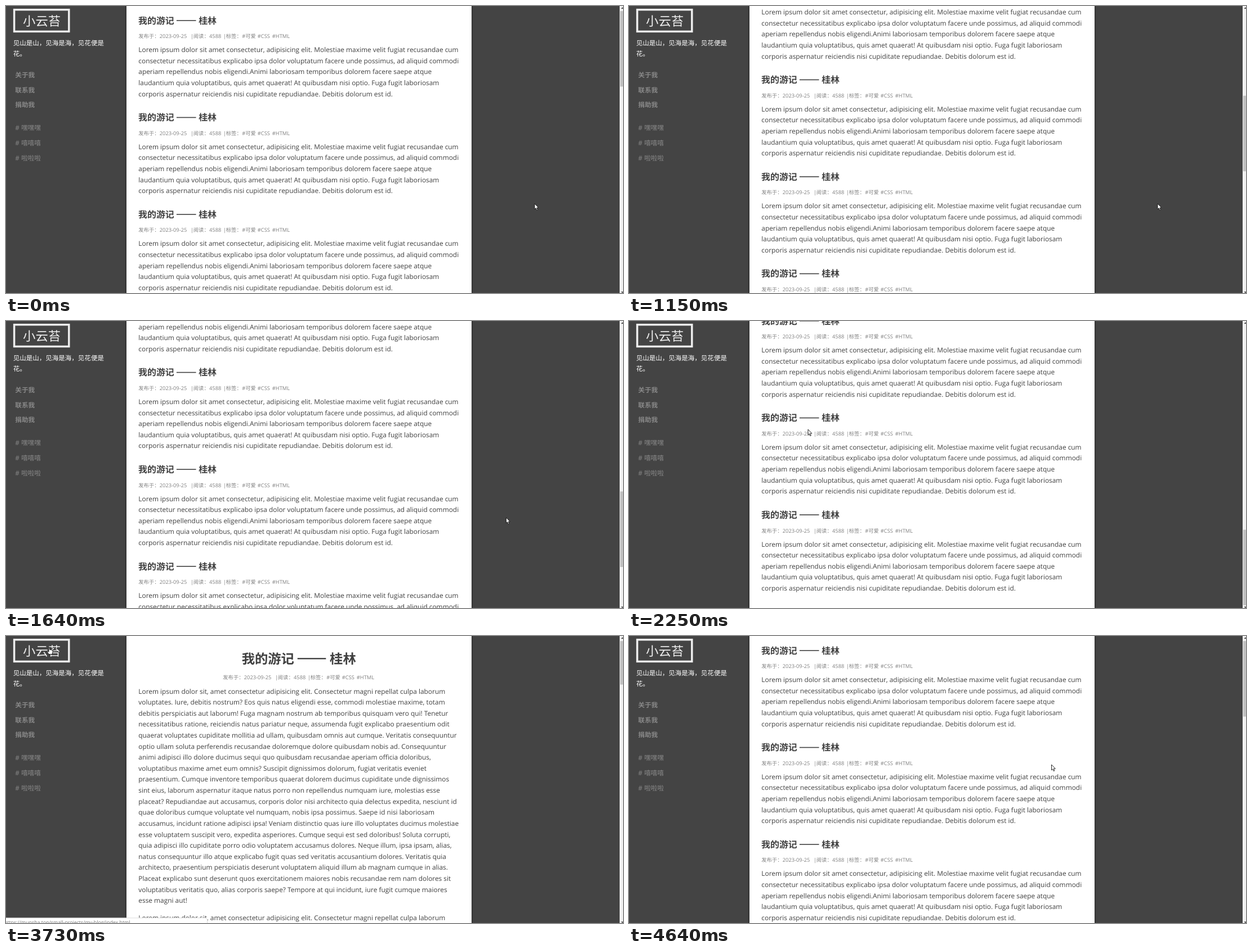
Animation of 1096 by 511 pixels, one loop 4710 ms. Source, as an HTML page with a canvas:

```html
<!DOCTYPE html>
<html lang="zh-CN">
<head>
<meta charset="utf-8">
<title>Blog</title>
<style>
html, body { margin: 0; width: 100%; height: 100%; overflow: hidden; background: #444; }
canvas { display: block; }
</style>
</head>
<body>
<canvas id="stage" width="1096" height="511"></canvas>
<script>
const W = 1096, H = 511, LOOP = 4710, TICK = 77.3;
const LEFT = 235.3, LINE = 19.62, ENTRY = 172.63, ENTRIES = 11;
const MAX_SCROLL = 1407;
const FONTS = '"Open Sans", "Noto Sans CJK SC", "Noto Sans CJK", sans-serif';
const CJK = '"Noto Sans CJK SC", "Noto Sans CJK", sans-serif';
const ctx = document.getElementById('stage').getContext('2d');

const excerpt = [
  'Lorem ipsum dolor sit amet consectetur, adipisicing elit. Molestiae maxime velit fugiat recusandae cum',
  'consectetur necessitatibus explicabo ipsa dolor voluptatum facere unde possimus, ad aliquid commodi',
  'aperiam repellendus nobis eligendi.Animi laboriosam temporibus dolorem facere saepe atque',
  'laudantium quia voluptatibus, quis amet quaerat! At quibusdam nisi optio. Fuga fugit laboriosam',
  'corporis aspernatur reiciendis nisi cupiditate repudiandae. Debitis dolorum est id.'
];
const article = [
  'Lorem ipsum dolor sit, amet consectetur adipisicing elit. Consectetur magni repellat culpa laborum',
  'voluptates. Iure, debitis nostrum? Eos quis natus eligendi esse, commodi molestiae maxime, totam',
  'debitis perspiciatis aut laborum! Fuga magnam nostrum ab temporibus quisquam vero qui! Tenetur',
  'necessitatibus ratione, reiciendis natus pariatur neque, assumenda fugit explicabo praesentium odit',
  'quaerat voluptates cupiditate mollitia ad ullam, quibusdam omnis aut cumque. Veritatis consequuntur',
  'optio ullam soluta perferendis recusandae doloremque dolore quibusdam nobis ad. Consequuntur',
  'animi adipisci illo dolore ducimus sequi quo quibusdam recusandae aperiam officia doloribus,',
  'voluptatibus maxime amet eum omnis? Suscipit dignissimos dolorum, fugiat veritatis eveniet',
  'praesentium. Cumque inventore temporibus quaerat dolorem ducimus cupiditate unde dignissimos',
  'sint eius, laborum aspernatur itaque natus porro non repellendus numquam iure, molestias esse',
  'placeat? Repudiandae aut accusamus, corporis dolor nisi architecto quia delectus expedita, nesciunt id',
  'quae doloribus cumque voluptate vel numquam, nobis ipsa possimus. Saepe id nisi laboriosam',
  'accusamus, incidunt ratione adipisci ipsa! Veniam distinctio quas iure illo voluptates ducimus molestiae',
  'esse voluptatem suscipit vero, expedita asperiores. Cumque sequi est sed doloribus! Soluta corrupti,',
  'quia adipisci illo cupiditate porro odio voluptatem accusamus dolores. Neque illum, ipsa ipsam, alias,',
  'natus consequuntur illo atque explicabo fugit quas sed veritatis accusantium dolores. Veritatis quia',
  'architecto, praesentium perspiciatis deserunt voluptatem aliquid illum ab magnam cumque in alias.',
  'Placeat explicabo sunt deserunt quos exercitationem maiores nobis recusandae rem nam dolores sit',
  'voluptatibus veritatis quo, alias corporis saepe? Tempore at qui incidunt, iure fugit cumque maiores',
  'esse magni aut!'
];
const metaParts = [
  [0, '发布于：'], [37.5, '2023-09-25'], [92.5, '|'], [97.5, '阅读：'], [125.7, '4588'],
  [150.5, '|'], [155.5, '标签：'], [184, '#可爱'], [211.5, '#CSS'], [237.5, '#HTML']
];

// Tracks are [tick, ...values], linear between ticks.
const scrollTrack = [
  [8, 0], [9, 55.6], [10, 165], [11, 216], [13, 216], [14, 440], [15, 585], [16, 705],
  [18, 830], [20, 1020], [21, 1142.7], [22, 1255], [23, 1335], [25, MAX_SCROLL]
];
const cursorTrack = [
  [20, 938.5, 352], [21, 888, 350], [22, 795, 340], [24, 560, 288], [26, 375, 222],
  [27, 327, 199], [29, 317.5, 193], [31, 320, 176], [32, 320, 182], [37, 320, 182],
  [38, 304, 172], [41, 175, 90], [43, 88, 30], [44, 76, 20], [49, 76, 20],
  [50, 82, 32], [52, 150, 91], [54, 300, 138], [57, 630, 207], [59, 748, 228], [60, 750, 229]
];

function sample(track, tick) {
  const next = track.findIndex(key => key[0] > tick);
  if (next === 0) return track[0].slice(1);
  if (next < 0) return track[track.length - 1].slice(1);
  const a = track[next - 1], b = track[next];
  const p = (tick - a[0]) / (b[0] - a[0]);
  return a.slice(1).map((v, i) => v + (b[i + 1] - v) * p);
}

function text(str, x, y, size, color, weight = 400, fonts = FONTS) {
  ctx.font = `${weight} ${size}px ${fonts}`;
  ctx.fillStyle = color;
  ctx.fillText(str, x, y);
}

function rect(x, y, w, h, color) {
  ctx.fillStyle = color;
  ctx.fillRect(x, y, w, h);
}

function heading(x, cy, size) {
  const base = cy + size * 0.37;
  text('我的游记', x - 0.3, base, size, '#404040', 700, CJK);
  rect(x + size * 4.24, cy - size * 0.04, size * 2.17, size * 0.1, '#404040');
  text('桂林', x + size * 6.7, base, size, '#404040', 700, CJK);
}

function meta(x, cy) {
  for (const [dx, str] of metaParts) text(str, x + dx, cy + 3.5, 9.3, '#808080');
}

function paragraph(lines, baseline) {
  lines.forEach((str, i) => text(str, LEFT, baseline + i * LINE, 11.88, '#404040'));
}

function sidebar() {
  ctx.strokeStyle = '#eee';
  ctx.lineWidth = 3.5;
  ctx.strokeRect(14.6, 6.6, 97.2, 38.8);
  text('小云苔', 30, 34.6, 22.4, '#eee', 300, CJK);
  text('见山是山，见海是海，见花便是', 12.7, 69.5, 11.52, '#fff', 400, CJK);
  text('花。', 12.7, 89.3, 11.52, '#fff', 400, CJK);
  ['关于我', '联系我', '捐助我'].forEach((s, i) =>
    text(s, 16.3, 126.7 + i * 26.8, 11.6, '#888', 700, CJK));
  ['嘿嘿嘿', '嘻嘻嘻', '啦啦啦'].forEach((s, i) => {
    const y = 221.3 + i * 26.8;
    text('#', 16.3, y, 11.8, '#888');
    text(s, 27, y, 11.6, '#888', 400, CJK);
  });
}

function home(scroll) {
  for (let i = 0; i < ENTRIES; i++) {
    const y = i * ENTRY - scroll;
    if (y < -ENTRY || y > H) continue;
    heading(LEFT, y + 25.7, 15.95);
    meta(LEFT, y + 53.7);
    paragraph(excerpt, y + 82.2);
  }
}

function post() {
  heading(419, 40, 23.3);
  meta(385.3, 73);
  paragraph(article, 102.5);
  paragraph(article.slice(0, 1), 506.3);
}

function triangle(y, dir) {
  ctx.fillStyle = '#505050';
  ctx.beginPath();
  ctx.moveTo(1092.5, y);
  ctx.lineTo(1097.5, y);
  ctx.lineTo(1095, y - 3 * dir);
  ctx.fill();
}

function scrollbar(top, height) {
  rect(1090, 0, 6, H, '#f1f1f1');
  rect(1091, top, 5, height, '#c1c1c1');
  triangle(5, 1);
  triangle(508.5, -1);
}

function statusBar(page) {
  ctx.fillStyle = '#fff';
  ctx.strokeStyle = '#ddd';
  ctx.lineWidth = 1;
  ctx.beginPath();
  ctx.moveTo(-1, 502);
  ctx.lineTo(354, 502);
  ctx.quadraticCurveTo(357.5, 502, 357.5, 506);
  ctx.lineTo(357.5, H + 2);
  ctx.lineTo(-1, H + 2);
  ctx.fill();
  ctx.stroke();
  text(`https://munsha.top/small-projects/my-blog/${page}.html`, -3, 513, 8.8, '#777');
}

function shape(points, x, y) {
  ctx.beginPath();
  points.forEach(([px, py]) => ctx.lineTo(x + px, y + py));
  ctx.closePath();
  ctx.fillStyle = '#fff';
  ctx.strokeStyle = '#111';
  ctx.lineWidth = 0.9;
  ctx.fill();
  ctx.stroke();
}

const arrow = [[0.5, 0], [0.5, 9.8], [2.7, 7.8], [4.3, 11.6], [5.9, 10.9], [4.4, 7.2], [7.4, 7.2]];
const hand = [[0, 0], [1.6, 0], [1.8, 4.2], [7, 5.4], [7, 9], [5.8, 12.5], [0, 12.5], [-3, 7.8], [-2, 6.8], [0, 8.4]];

function draw(tick) {
  const onPost = tick >= 34 && tick < 50;
  const scroll = tick < 34 ? sample(scrollTrack, tick)[0] : 0;
  const [mx, my] = sample(cursorTrack, tick);

  rect(0, 0, W, H, '#444');
  ctx.save();
  ctx.shadowColor = 'rgba(0,0,0,.6)';
  ctx.shadowBlur = 4;
  rect(214, -10, 613, H + 20, '#fff');
  ctx.restore();
  sidebar();

  if (onPost) post();
  else home(scroll);
  scrollbar(9 + scroll / 3.88, onPost ? 77.5 : 134.5);

  if (tick >= 31 && tick < 34) statusBar('article');
  if (tick >= 46 && tick < 54) statusBar('index');
  const overLink = (tick >= 31 && tick < 34) || (tick >= 43 && tick < 51);
  shape(overLink ? hand : arrow, mx, my);
}

function frame(now) {
  draw(Math.floor(((now % LOOP) + 10) / TICK));
  requestAnimationFrame(frame);
}

ctx.textRendering = 'geometricPrecision';
requestAnimationFrame(frame);
</script>
</body>
</html>
```
